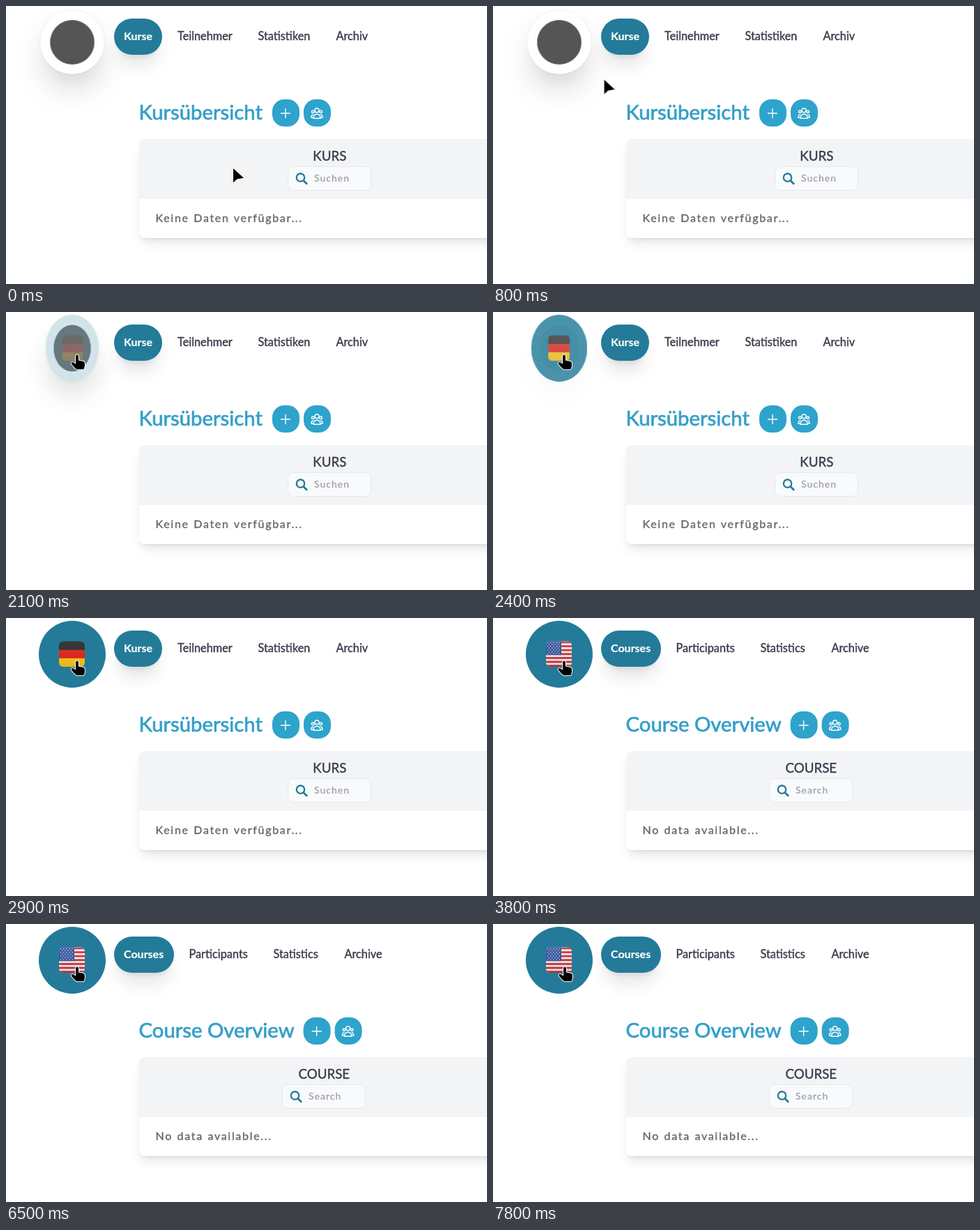
These frames come from a looping animation (690x399 px, 8 s). An HTML page:

```html
<!DOCTYPE html>
<html lang="de">
<head>
<meta charset="utf-8">
<title>Kursübersicht</title>
<style>
  :root { --dark: #237b99; --light: #2ea3cc; --loop: 8s; --smooth: cubic-bezier(.4, 0, .2, 1); }
  html, body { margin: 0; width: 100%; height: 100%; overflow: hidden; background: #fff; }
  #stage { position: relative; width: 690px; height: 399px; overflow: hidden; }
  #stage div, #stage svg { position: absolute; }
  svg { left: 0; top: 0; overflow: visible; }

  .table { left: 191px; top: 191px; width: 540px; height: 142px; border-radius: 8px; background: linear-gradient(#f3f4f6 86px, #fff 86px);
    box-shadow: 0 10px 15px -3px rgba(0,0,0,.1), 0 4px 6px -4px rgba(0,0,0,.1); }
  .pill { left: 155px; top: 18px; height: 52px; border-radius: 26px; background: var(--dark);
    box-shadow: 0 20px 25px -5px rgba(0,0,0,.1), 0 8px 10px -6px rgba(0,0,0,.1); }

  text { font-family: Lato, "Open Sans", sans-serif; font-size: 16.3px; fill: #3a3b4b; stroke: #3a3b4b; stroke-width: .4; stroke-linejoin: round; }
  .active { font-size: 16px; font-weight: 700; fill: #fff; stroke: #fff; stroke-width: .2; }
  .title { font-size: 29.3px; fill: #359fc9; stroke: #359fc9; stroke-width: .75; }
  .head { font-size: 18.7px; text-anchor: middle; }
  .hint { font-size: 14px; letter-spacing: 1px; fill: #999ca3; stroke: #999ca3; stroke-width: .2; }
  .empty { font-size: 16px; letter-spacing: 1.7px; word-spacing: .8px; fill: #65676f; stroke: #65676f; }
  .icon { fill: none; stroke: #fff; stroke-width: 1.4; stroke-linecap: round; }

  .de { animation: german var(--loop) step-end infinite; }
  .en { animation: english var(--loop) step-end infinite; }
  @keyframes german { 0%, 70% { visibility: visible } 47.5%, 81.25% { visibility: hidden } }
  @keyframes english { 0%, 70% { visibility: hidden } 47.5%, 81.25% { visibility: visible } }

  .coin, .coin div { width: 96px; height: 96px; border-radius: 50%; }
  .coin { left: 47px; top: 4px; animation: grow var(--loop) var(--smooth) infinite; }
  .coin .turn { animation: turn var(--loop) var(--smooth) infinite; }
  .front { background: radial-gradient(circle, #555 33px, #fff 33.8px); box-shadow: 0 25px 50px -12px rgba(0,0,0,.25), 0 0 3px rgba(0,0,0,.12);
    animation: fade-out var(--loop) var(--smooth) infinite; }
  .back { background: var(--dark); transform: scaleX(-1); animation: fade-in var(--loop) var(--smooth) infinite; }
  @keyframes grow { 0%, 10.6% { transform: scale(.952) } 16.25%, 100% { transform: none } }
  @keyframes turn { 0%, 23.3% { transform: rotateY(0deg) } 35.8%, 100% { transform: rotateY(180deg) } }
  @keyframes fade-out { 0%, 23.3% { opacity: 1 } 35.8%, 100% { opacity: 0 } }
  @keyframes fade-in { 0%, 23.3% { opacity: 0 } 35.8%, 100% { opacity: 1 } }

  .cursor { fill: #000; stroke: #fff; stroke-width: 2; stroke-linejoin: round; paint-order: stroke; animation: travel var(--loop) ease-in-out infinite; }
  .arrow { animation: arrow var(--loop) step-end infinite; }
  .hand { animation: hand var(--loop) step-end infinite; }
  @keyframes travel {
    0%, 3.1% { transform: translate(326px, 233px) }
    13.75%, 97.49% { transform: translate(102px, 62px) }
    97.5%, 100% { transform: translate(103px, 62px) }
  }
  @keyframes arrow { 0% { visibility: visible } 10.4%, 100% { visibility: hidden } }
  @keyframes hand { 0% { visibility: hidden } 10.4%, 100% { visibility: visible } }
</style>
</head>
<body>
<div id="stage">
  <div class="table"></div>
  <div class="coin">
    <div class="turn">
      <div class="front"></div>
      <div class="back">
        <svg width="96" height="96">
          <defs>
            <clipPath id="flag"><rect x="29" y="29.5" width="37" height="36.5" rx="6"/></clipPath>
            <linearGradient id="shade" x2="0" y2="1">
              <stop stop-color="#fff" stop-opacity=".08"/><stop offset="1" stop-color="#000" stop-opacity=".08"/>
            </linearGradient>
          </defs>
          <g clip-path="url(#flag)">
            <g class="de">
              <path fill="#292929" d="M29 29h37v13H29z"/>
              <path fill="#df2317" d="M29 41.7h37v12.5H29z"/>
              <path fill="#fdc51c" d="M29 53.8h37v13H29z"/>
            </g>
            <g class="en" id="stripes"></g>
            <path fill="url(#shade)" d="M29 29h37v38H29z"/>
          </g>
        </svg>
      </div>
    </div>
  </div>
  <div id="pages"></div>
  <svg width="690" height="399">
    <g class="cursor">
      <path class="arrow" d="M0 0V20.5L5.5 15.5 15 13.8Z"/>
      <path class="hand" d="M-2 2.5Q-2-.5 0-.5T2 2.5V7.5L8.5 8.7Q11 9.3 11 12V15Q10.8 18 9.2 20.3H-.8Q-4.5 17.5-8.2 12.5Q-8.8 10-6.5 9.8L-2 12.5Z"/>
    </g>
  </svg>
</div>
<script>
  const label = (cls, x, y, str) => `<text class="${cls}" x="${x}" y="${y}">${str}</text>`;

  const buttons = x => `
    <g transform="translate(${x} 134)">
      <rect width="39" height="39" rx="17" fill="#2ea3cc"/>
      <rect x="45" width="39" height="39" rx="17" fill="#2ea3cc"/>
      <path class="icon" d="M12.5 20h13M19 13.5v13"/>
      <g class="icon">
        <circle cx="64" cy="15.8" r="3"/><circle cx="58.3" cy="17.8" r="1.8"/><circle cx="69.7" cy="17.8" r="1.8"/>
        <path d="M59 27.3q0-6 5-6t5 6zM58.5 22q-2.6.2-2.6 4h2.5M69.5 22q2.6.2 2.6 4h-2.5"/>
      </g>
    </g>`;

  const search = x => `
    <rect x="${x + .5}" y="230.5" width="119" height="34" rx="8" fill="#f9fafb" stroke="#e5e7eb"/>
    <g fill="none" stroke="#237b99" stroke-width="2.3" stroke-linecap="round">
      <circle cx="${x + 18.5}" cy="246.2" r="5.7"/><path stroke-width="2.8" d="M${x + 23} 250.8l4.2 4.2"/>
    </g>`;

  const page = p => `
    <div class="${p.lang}">
      <div class="pill" style="width:${p.pill}px"></div>
      <svg width="690" height="399">
        ${label('active', 169, 49, p.active)}
        ${p.nav.map(([x, str]) => label('', x, 49, str)).join('')}
        ${label('title', 190.5, 163, p.title)}
        ${buttons(p.buttons)}
        ${label('head', p.field + 60.3, 222, p.head)}
        ${search(p.field)}
        ${label('hint', p.field + 38, 252, p.hint)}
        ${label('empty', 214.5, 310, p.empty)}
      </svg>
    </div>`;

  document.getElementById('pages').innerHTML = [
    { lang: 'de', pill: 69, active: 'Kurse', nav: [[246, 'Teilnehmer'], [361.5, 'Statistiken'], [473.5, 'Archiv']],
      title: 'Kursübersicht', buttons: 382, field: 404, head: 'KURS', hint: 'Suchen', empty: 'Keine Daten verfügbar...' },
    { lang: 'en', pill: 86, active: 'Courses', nav: [[262.5, 'Participants'], [383.5, 'Statistics'], [485.5, 'Archive']],
      title: 'Course Overview', buttons: 426.6, field: 396, head: 'COURSE', hint: 'Search', empty: 'No data available...' }
  ].map(page).join('');

  const bar = 36.5 / 13;
  let flag = '<path fill="#f2f2f2" d="M29 29h37v38H29z"/>';
  for (let i = 0; i < 13; i += 2) flag += `<rect x="29" y="${29.5 + i * bar}" width="37" height="${bar}" fill="#d0313a"/>`;
  flag += `<rect x="29" y="29" width="22" height="${7 * bar + .5}" fill="#2f519c"/>`;
  for (let row = 0; row < 7; row++)
    for (let col = 0; col < 5 - row % 2; col++)
      flag += `<circle cx="${31.5 + col * 4.2 + row % 2 * 2.1}" cy="${31.5 + row * 2.6}" r=".75" fill="#dfe5f2"/>`;
  document.getElementById('stripes').innerHTML = flag;
</script>
</body>
</html>
```
